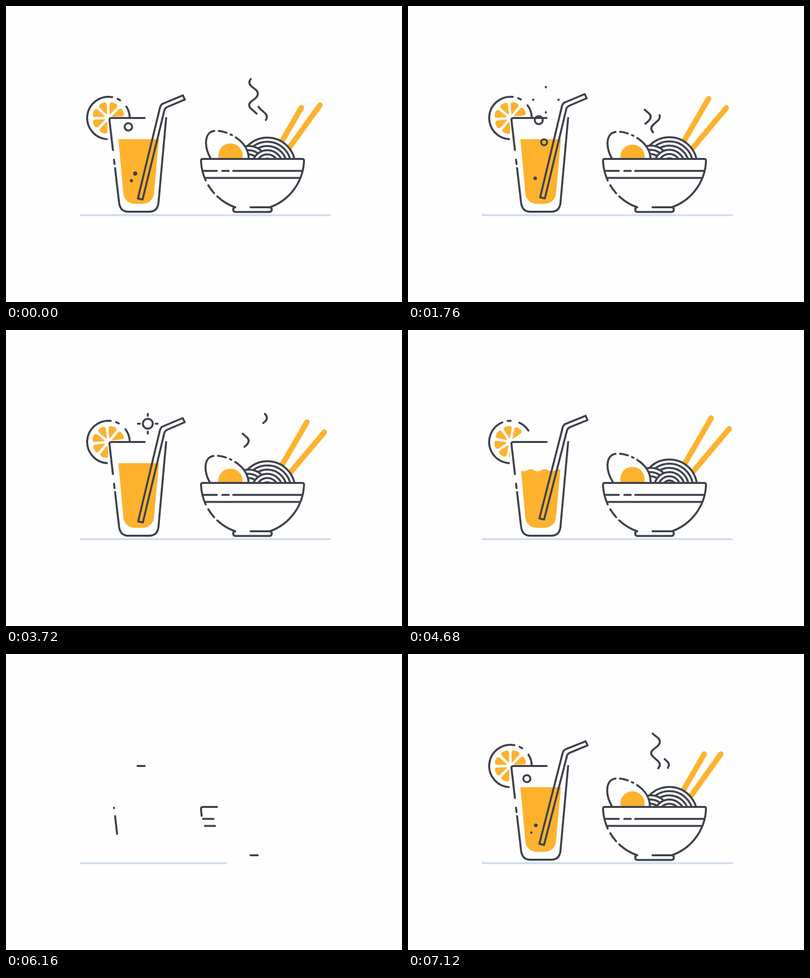
Recreate the animation shown at these times as an HTML page. Size 800 px wide and 600 px high, loop 7.16 s.

```html
<!DOCTYPE html>
<html lang="en">
<head>
<meta charset="utf-8">
<title>Juice and noodles</title>
<style>
html, body { margin: 0; width: 100%; height: 100%; overflow: hidden; background: #fefefe; }
svg { display: block; width: 800px; height: 600px; }
.ink { fill: none; stroke: #3f424c; stroke-width: 4; stroke-linecap: round; stroke-linejoin: round; }
.dot { fill: #3f424c; stroke: none; }
.white { fill: #fefefe; }
.gold { fill: #fdb22e; }
.slice { stroke: #fdb22e; stroke-width: 2; }
.stick { fill: none; stroke: #fdb22e; stroke-width: 11; stroke-linecap: round; }
</style>
</head>
<body>
<svg viewBox="0 0 800 600">
  <defs>
    <clipPath id="aboveRim"><path d="M380 100H720V309H380Z"/></clipPath>
    <clipPath id="cup"><path d="M227 270H309L299 379A23 22 0 0 1 276 401H260A23 22 0 0 1 237 379Z"/></clipPath>
    <clipPath id="sector"><path id="sweep"/></clipPath>
  </defs>
  <path data-draw="ground" d="M149 424H656" fill="none" stroke="#d2deec" stroke-width="4"/>

  <g clip-path="url(#sector)"><g id="lemon" class="ink"></g></g>
  <path class="white" d="M209 227H324L308 417H231Z"/>
  <g clip-path="url(#cup)"><path id="juice" class="gold"/></g>
  <g class="ink">
    <path data-draw="outline" d="M280 227H213Q208.600 227 209 231L216 292"/>
    <path data-draw="outline" d="M218.200 311.500L219.300 320.500"/>
    <path data-draw="outline" d="M220.300 328.500L228.500 399Q231 417 247 417H289Q306 417 308 399L323.500 227"/>
    <g id="bubbles"></g>
    <path id="straw" pathLength="100" d="M267 388L311 203Q313 196.500 318 195L357 178.500L361 187L326 202Q321.500 204 320 208L276.500 390Z"/>
  </g>

  <g clip-path="url(#aboveRim)">
    <path id="stickL" class="stick"/>
    <path id="stickR" class="stick"/>
    <g id="noodles" class="ink"></g>
    <path class="egg white" d="M414 318C398 286 399 255 423 255C447 254 490 275 490 318Z"/>
    <circle id="yolk" class="gold" cx="453.500" cy="305.500" r="24.500"/>
    <path class="egg ink" stroke-dasharray="71 9 16 9 3 9 300" d="M415 316L413 311C398 286 399 255 423 255C447 254 490 275 490 311V316"/>
  </g>
  <g class="ink">
    <path data-draw="outline" d="M394 315V313.500Q394 310 397.500 310H598.500Q602 310 602 313.500V315A104 104 0 0 1 533 408"/>
    <path data-draw="outline" data-dash="40 11 20 9 90" d="M394 315A104 104 0 0 0 463 408"/>
    <path data-draw="outline" d="M494 408H533Q537 408.500 537 412.500T533 417.500H463Q459 417 459 412.500T463 408"/>
    <path data-draw="outline" data-dash="28 11 13 9 200" d="M398 334.300H598"/>
    <path data-draw="outline" d="M402 348.500H594"/>
    <path class="steam" pathLength="100" d="M495 256Q488 248 495 241L504 233Q513 225 505 217L496 209Q487 201 495 194L504 187Q513 178 505 170L496 163Q488 156 494.500 148"/>
    <path class="steam" pathLength="100" d="M525 231Q530 223 523 217L514 209Q505 201 514 193L523 186Q531 178 523 170"/>
    <path class="steam" pathLength="100" d="M477 256Q469 248 477 241L486 233Q494 225 487 218L478 210"/>
  </g>
</svg>
<script>
const LOOP = 7160, LEAD = 1160;   // LEAD: how far into the scene the page opens
const LAND = 640, LEAVE = 5760;   // parts touch down, parts start to go
const $ = id => document.getElementById(id);
const clamp = v => Math.max(0, Math.min(1, v));
const smooth = p => p * p * (3 - 2 * p);

// Motion rules shared by all parts, u is the scene time
const enter = (u, start, span) => 1 - (1 - clamp((u - start) / span)) ** 3;
const settle = (u, tau) => Math.exp(-Math.max(0, u - LAND) / tau);
const exit = u => smooth(clamp((u - LEAVE) / 400));
const windUp = u => { const p = clamp((u - LEAVE) / 390); return p * p * (3 * p - 2); };
function wobble(u, a, b) {
  const turn = .022 * (u - LEAD);
  return (a * Math.cos(turn) + b * Math.sin(turn)) * Math.exp(-Math.max(0, u - 1120) / 300);
}

function polar(deg, r) {
  const a = deg * Math.PI / 180;
  return [207 + r * Math.cos(a), 227 + r * Math.sin(a)].join(" ");
}
function arc(from, to, r) {
  const d = to - from;
  return `${polar(from, r)}A${r} ${r} 0 ${+(Math.abs(d) > 180)} ${+(d > 0)} ${polar(to, r)}`;
}
const move = (x, y, deg, pivot) => `translate(${x} ${y}) rotate(${deg} ${pivot})`;

// Slices every 45 degrees; noodle rings 8.5 apart
let slices = "", rings = "";
for (let k = 0; k < 6; k++)
  slices += `<path class="gold slice" d="M9 0L26 -6.800Q30.500 -8.500 31.300 -4Q32 0 31.300 4Q30.500 8.500 26 6.800Z"
    transform="translate(207 227) rotate(${-24 - 45 * k})"/>`;
$("lemon").innerHTML = slices +
  [[0, -33], [-57, -65], [-80, -266]].map(([a, b]) => `<path d="M${arc(a, b, 43)}"/>`).join("");
for (const [x, outer] of [[528, 56], [490, 39], [528, 30.5]])
  for (let i = 0; i < 3; i++)
    rings += `<circle class="white" cx="${x}" cy="322" r="${outer - 8.5 * i}"/>`;
$("noodles").innerHTML = rings;

// Outlines that draw themselves, keeping their own gaps
const drawn = [...document.querySelectorAll("[data-draw]")].map(el => {
  const len = el.getTotalLength();
  return { el, len, kind: el.dataset.draw, dash: (el.dataset.dash || String(len + 1)).split(" ").map(Number) };
});
function draw({ el, len, dash }, p) {
  el.style.display = p > 0 ? "" : "none";
  let left = len * p + (p === 1 ? 1 : 0);
  const out = [];
  for (const d of dash) {
    out.push(Math.min(d, left));
    left -= d;
    if (left <= 0) break;
  }
  if (out.length % 2) out.push(999);
  else out[out.length - 1] = 999;
  el.setAttribute("stroke-dasharray", out.join(" "));
}
function trim(el, from, to) {
  el.style.display = to > from ? "" : "none";
  el.setAttribute("stroke-dasharray", `${to - from} 300`);
  el.setAttribute("stroke-dashoffset", -from);
}

const steam = [
  { first: 800, period: 670, travel: 360, delay: 240 },
  { first: 1050, period: 695, travel: 250, delay: 180 },
  { first: 1400, period: 650, travel: 200, delay: 150 }
];
const strands = document.querySelectorAll(".steam");
const eggs = document.querySelectorAll(".egg");

const RISE = 900;
const bubbleStarts = [545, 1035, 1110, 1410, 1870, 2235, 2467, 2845, 3060, 3514, 3654, 3975];
const zigzag = [[0, 249], [125, 261], [453, 275], [570, 240], [700, 265], [RISE, 278.5]];
function swayX(age) {
  const i = zigzag.findIndex(([t]) => t > age);
  if (i < 0) return zigzag[zigzag.length - 1][1];
  const [[t0, x0], [t1, x1]] = zigzag.slice(i - 1, i + 1);
  return x0 + (x1 - x0) * smooth((age - t0) / (t1 - t0));
}

function bubble(u, start, i) {
  const age = u - start, q = (age - RISE) / 160;
  if (age < 0 || q > 1) return "";
  const p = clamp(age / RISE), drift = clamp((p - .8) / .2);
  const r = 10 * p ** .75;
  const x = swayX(age) + i % 2 * 8 * drift;
  const y = 364 - 174 * p - (i % 4 === 1 || i % 4 === 2 ? 44 * drift : 0);
  const size = r < 3 ? `class="dot" r="${r + 2}"` : `r="${r}"`;
  let svg = q < .2 ? `<circle cx="${x}" cy="${y}" ${size}/>` : "";
  if (q >= 0) {
    const near = 16 + 10.5 * q ** 2.6, far = Math.max(near + .1, 19.2 + 7.3 * q ** .7);
    for (let a = 0; a < 360; a += 90)
      svg += `<path d="M${near} 0H${far}" transform="${move(x, y, a, "0 0")}"/>`;
  }
  return svg;
}

function stick(el, x, length, deg) {
  const a = deg * Math.PI / 180;
  el.style.display = length > 5 ? "" : "none";
  el.setAttribute("d", `M${x} 318L${x + length * Math.cos(a)} ${318 - length * Math.sin(a)}`);
}

function render(u) {
  const shown = {
    ground: smooth(Math.min(clamp((u + 40) / 360), clamp((6350 - u) / 310))),
    outline: smooth(Math.min(clamp((u - 60) / 500), clamp((6330 - u) / 370)))
  };
  for (const d of drawn) draw(d, shown[d.kind]);

  const gone = exit(u), back = windUp(u);

  const spin = -4 + 9 * settle(u, 700) - 272 * (1 - enter(u, 506, 410)) - 268 * gone;
  $("lemon").setAttribute("transform", `rotate(${spin} 207 227)`);
  $("sweep").setAttribute("d", spin > -266 ? `M207 227L${arc(92, Math.min(448, 367 + spin), 60)}Z` : "");

  const level = 270 + 134 * (1 - enter(u, 200, 936) + gone);
  const amp = 3 * clamp((level - 270) / 20);
  let wave = "M220 410";
  for (let x = 220; x <= 316; x += 2)
    wave += `L${x} ${level - amp * Math.cos((x - 248.5 + (u - LAND) * .06) * 2 * Math.PI / 28.3)}`;
  $("juice").setAttribute("d", wave + "V410Z");

  const drop = settle(u, 150) + gone;
  $("straw").setAttribute("transform", move(
    17.6 * drop + wobble(u, -.2, -1.7), -43 * drop + wobble(u, 4.5, 3.8), 8.7 * drop + wobble(u, 0, -.8), "357 178.5"));
  const half = 50 * Math.min(clamp((u - 612) / 280), clamp((6160 - u) / 260));
  trim($("straw"), Math.max(0, 49.2 - half), half < 50 ? Math.min(100, 49.2 + half) : 100);

  stick($("stickL"), 532, (152 - 40 * settle(u, 700) + wobble(u, -4, -5)) * (enter(u, 660, 300) - back), 60);
  stick($("stickR"), 550, (145 + wobble(u, -1, 4)) * (enter(u, 520, 400) - back), 50 + 12 * settle(u, 500));

  const sink = 60 * (1 - enter(u, 260, 340) + back);
  $("noodles").setAttribute("transform", `translate(0 ${sink + wobble(u, .9, -3.8)})`);
  const tilt = move(wobble(u, .6, 2), 1.2 * sink + wobble(u, -1, 1), 9 * settle(u, 250), "481 300");
  for (const el of eggs) el.setAttribute("transform", tilt);
  $("yolk").setAttribute("transform", `translate(0 ${sink - 6 * settle(u, 600)})`);

  steam.forEach(({ first, period, travel, delay }, i) => {
    const age = u - first - period * Math.max(0, Math.min(5, Math.floor((u - first) / period)));
    trim(strands[i], 100 * clamp((age - delay) / travel), 100 * clamp(age / travel));
  });
  $("bubbles").innerHTML = bubbleStarts.map((start, i) => bubble(u, start, i)).join("");
}

const begin = performance.now();
function tick() {
  render((performance.now() - begin + LEAD) % LOOP);
  requestAnimationFrame(tick);
}
tick();
</script>
</body>
</html>
```
